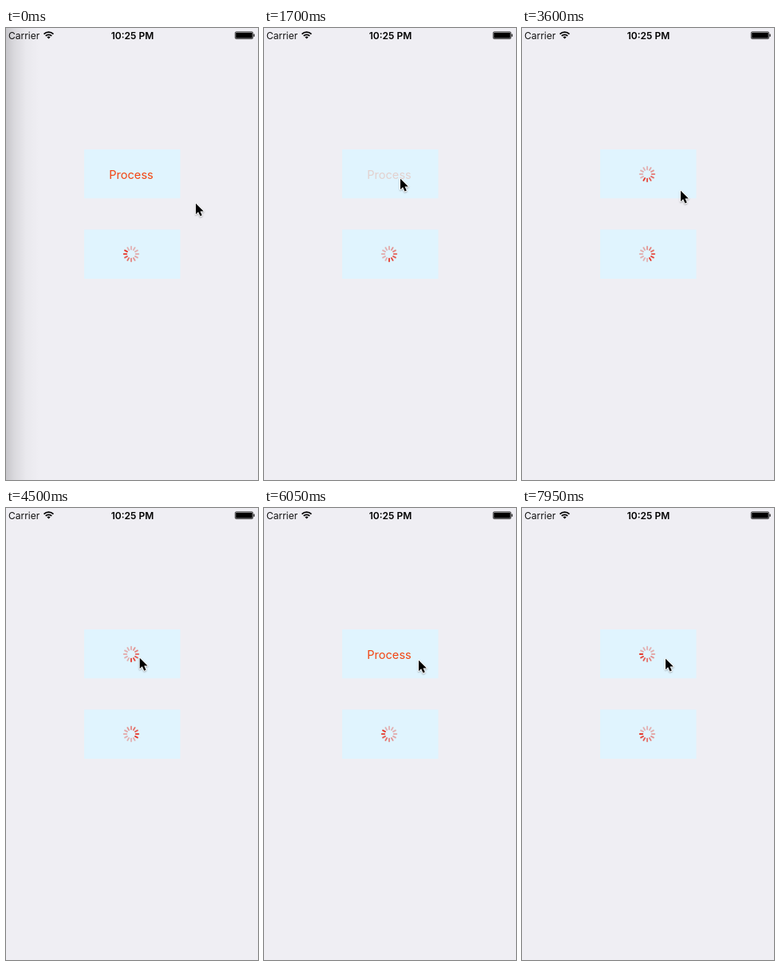
These frames come from a looping animation (316 by 566 pixels, 8000 ms). An HTML page with a canvas:

```html
<!DOCTYPE html>
<html lang="en">
<head>
<meta charset="utf-8">
<title>Process button</title>
<style>
  html, body { margin: 0; width: 100%; height: 100%; overflow: hidden; background: #efeef3; }
  canvas { display: block; width: 316px; height: 566px; }
</style>
</head>
<body>
<canvas id="stage"></canvas>
<script>
const W = 316, H = 566, LOOP = 8000, FRAME = 50;
const canvas = document.getElementById('stage');
const ctx = canvas.getContext('2d');
const scale = window.devicePixelRatio || 1;
canvas.width = W * scale;
canvas.height = H * scale;

// Pointer tip: [time, x, y]
const POINTER = [
  [0, 238, 219], [850, 180, 186], [1450, 171, 188], [1750, 171, 188],
  [2300, 217, 196], [2600, 218, 197], [3350, 214, 199], [3600, 199, 203],
  [4220, 176, 192], [4600, 166, 186], [5350, 166, 186], [5900, 193, 189],
  [6050, 194, 190], [6550, 180, 188], [LOOP, 180, 188]
];
const PRESSES = [1550, 4800, 6800];
const SHADOW_END = 1300;

const clamp = v => Math.max(0, Math.min(1, v));
const ramp = (t, from, length) => clamp((t - from) / length);
const ease = u => u * u * (3 - 2 * u);

function pointerAt(t) {
  const i = POINTER.findIndex((p, n) => n > 0 && t <= p[0]);
  const [t0, x0, y0] = POINTER[i - 1];
  const [t1, x1, y1] = POINTER[i];
  const u = ease((t - t0) / (t1 - t0));
  return [x0 + (x1 - x0) * u, y0 + (y1 - y0) * u];
}

// Opacity of label and spinner, and when the spinner began turning
function buttonState(t) {
  const [start, stop, again] = PRESSES;
  if (t >= stop && t < again) {
    return {
      label: ramp(t, stop + 250, 200),
      spinner: 1 - ramp(t, stop + 150, 100),
      since: start + 400
    };
  }
  const press = t < stop ? start : again;
  return {
    label: t < press ? 1 : 0.2 * (1 - ramp(t, press + 200, 150)),
    spinner: ramp(t, press + 300, 150),
    since: press + 400
  };
}

function text(str, x, y, font, color, align) {
  ctx.font = font + ' Inter, Roboto, sans-serif';
  ctx.fillStyle = color;
  ctx.textAlign = align;
  ctx.fillText(str, x, y);
}

function drawSpinner(x, y, turns, alpha) {
  if (alpha <= 0) return;
  const head = Math.floor(turns * 12 + 1e-6);
  ctx.save();
  ctx.translate(x, y);
  ctx.lineCap = 'round';
  ctx.lineWidth = 1.8;
  ctx.strokeStyle = '#e63a2e';
  for (let i = 0; i < 12; i++) {
    const age = (((head - i) % 12) + 12) % 12;
    ctx.globalAlpha = alpha * Math.max(0.36, 1 - age * 0.1);
    const a = i * Math.PI / 6;
    const s = Math.sin(a), c = -Math.cos(a);
    ctx.beginPath();
    ctx.moveTo(s * 5.7, c * 5.7);
    ctx.lineTo(s * 9.3, c * 9.3);
    ctx.stroke();
  }
  ctx.restore();
}

function drawStatusBar() {
  text('Carrier', 3, 14, '400 12px', '#111', 'left');
  text('10:25 PM', 158.5, 14, '600 12px', '#000', 'center');

  ctx.strokeStyle = ctx.fillStyle = '#000';
  ctx.lineWidth = 1.7;
  for (const r of [5.3, 8.4]) {
    ctx.beginPath();
    ctx.arc(53.5, 13.6, r, -Math.PI * 0.75, -Math.PI * 0.25);
    ctx.stroke();
  }
  ctx.beginPath();
  ctx.moveTo(53.5, 13.6);
  ctx.arc(53.5, 13.6, 3, -Math.PI * 0.75, -Math.PI * 0.25);
  ctx.fill();

  ctx.lineWidth = 0.7;
  ctx.beginPath();
  ctx.roundRect(287.3, 4.8, 22.4, 8.8, 1.5);
  ctx.stroke();
  ctx.fillRect(288.2, 5.7, 20.6, 7);
  ctx.fillRect(310.4, 7.6, 1.2, 3.2);
}

function drawShadow() {
  const g = ctx.createLinearGradient(0, 0, 42, 0);
  g.addColorStop(0, 'rgba(0,0,0,0.17)');
  g.addColorStop(0.25, 'rgba(0,0,0,0.09)');
  g.addColorStop(0.6, 'rgba(0,0,0,0.025)');
  g.addColorStop(1, 'rgba(0,0,0,0)');
  ctx.fillStyle = g;
  ctx.fillRect(0, 0, 42, H);
}

function drawPointer(t) {
  const [x, y] = pointerAt(t);
  ctx.save();
  ctx.translate(x, y);
  if (PRESSES.some(p => t >= p && t < p + 100)) {
    ctx.strokeStyle = 'rgba(60,60,60,0.5)';
    ctx.lineWidth = 1.5;
    ctx.beginPath();
    ctx.arc(1.5, 0.5, 21.5, 0, Math.PI * 2);
    ctx.stroke();
  }
  const arrow = new Path2D('M0 .8V14.2L3.1 11.3 5.5 16.6 7.8 15.6 5.5 10.5H9.8Z');
  ctx.lineJoin = 'round';
  ctx.lineWidth = 1.8;
  ctx.strokeStyle = '#fff';
  ctx.shadowColor = 'rgba(0,0,0,0.3)';
  ctx.shadowBlur = 2 * scale;
  ctx.shadowOffsetY = scale;
  ctx.stroke(arrow);
  ctx.shadowColor = 'transparent';
  ctx.fillStyle = '#000';
  ctx.fill(arrow);
  ctx.restore();
}

function draw(t) {
  ctx.setTransform(scale, 0, 0, scale, 0, 0);
  ctx.fillStyle = '#efeef3';
  ctx.fillRect(0, 0, W, H);
  if (t < SHADOW_END) drawShadow();
  drawStatusBar();

  ctx.fillStyle = '#e0f4fe';
  ctx.fillRect(98, 152, 120.5, 61.3);
  ctx.fillRect(98, 252.4, 120.5, 61.6);

  const state = buttonState(t);
  ctx.globalAlpha = state.label;
  text('Process', 157, 188.7, '400 14.6px', '#f2440f', 'center');
  ctx.globalAlpha = 1;
  drawSpinner(157, 183, (t - state.since) / 1000, state.spinner);
  drawSpinner(157, 283, t / 1000 + 10.1 / 12, 1);
  drawPointer(t);
}

function tick() {
  const t = performance.now() % LOOP;
  draw(Math.floor(t / FRAME) * FRAME);
  requestAnimationFrame(tick);
}
tick();
</script>
</body>
</html>
```
